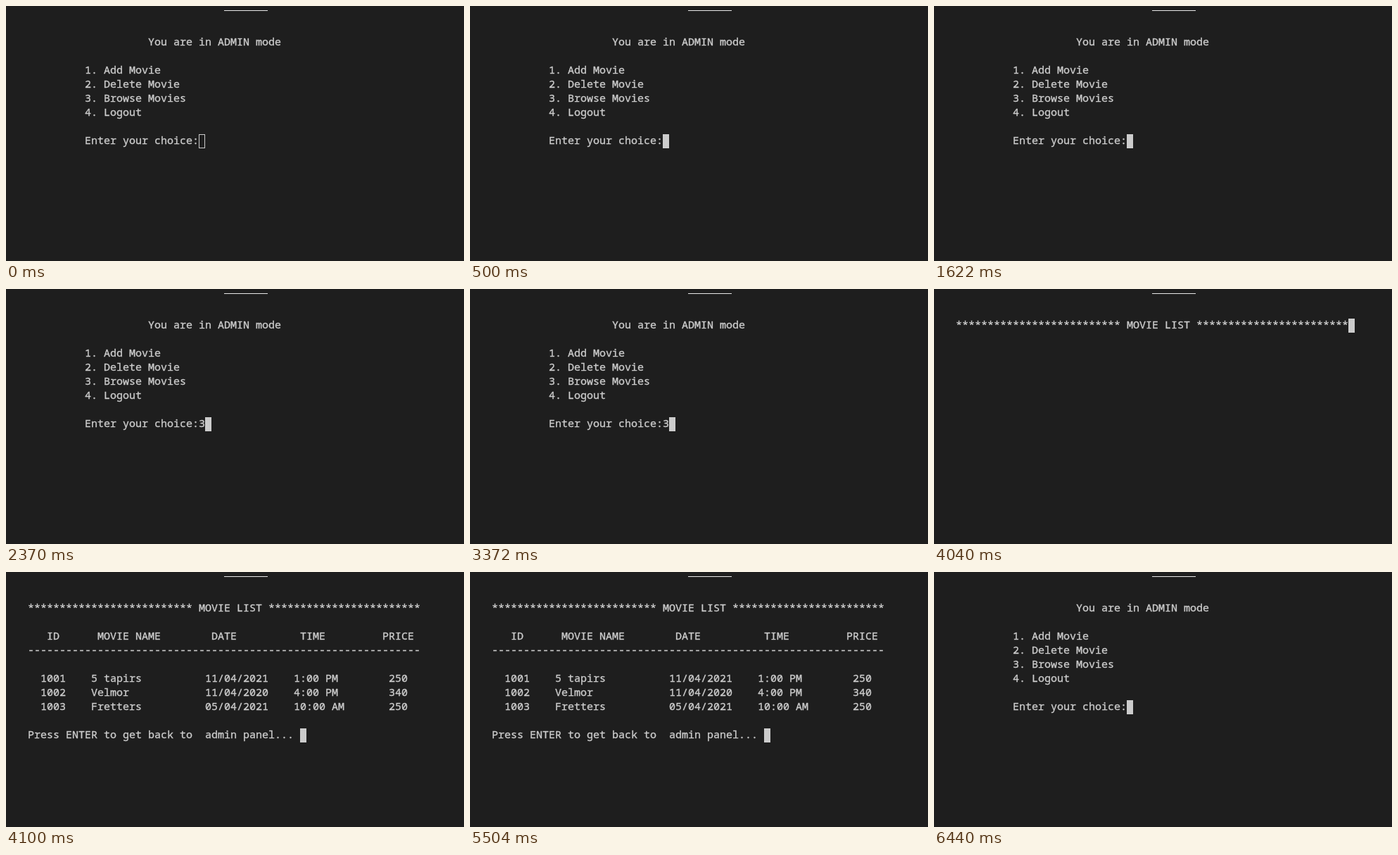
Recreate the animation shown at these times as an HTML page. Size 651 px wide and 362 px high, loop 8 s.

```html
<!DOCTYPE html>
<html lang="en">
<head>
<meta charset="utf-8">
<title>Terminal movie list</title>
<style>
  html, body { margin: 0; width: 100%; height: 100%; overflow: hidden; background: #1e1e1e; }
  .stage { position: relative; width: 651px; height: 362px; overflow: hidden; background: #1e1e1e; }
  .rule { position: absolute; left: 310px; top: 6px; width: 62px; height: 1px; background: #e7e7e7; }

  /* Character grid: 9 x 20 px cells, first column at x = 31 */
  pre {
    position: absolute; left: 31px; top: 40px; margin: 0;
    font: 15px/20px "Noto Sans Mono", "DejaVu Sans Mono", monospace;
    font-variant-ligatures: none;
    color: #ccc; white-space: pre;
    -webkit-text-stroke: 0.35px #ccc;
  }
  .body { top: 80px; }
  .digit { left: 274px; top: 180px; }
  .cursor {
    position: absolute; left: 0; top: 0; width: 9px; height: 20px;
    box-sizing: border-box; border: 1px solid #ccc;
  }

  .menu, .digit, .head, .body, .cursor { animation: 8s step-end infinite; }
  .menu { animation-name: menu; }
  .digit { animation-name: digit; }
  .head { animation-name: head; }
  .body { animation-name: body; }
  .cursor { animation-name: cursor; }

  @keyframes menu {
    0%, 80.5%, 100% { visibility: visible; }
    50.5% { visibility: hidden; }
  }
  @keyframes digit {
    0%, 50.5%, 100% { visibility: hidden; }
    29.625% { visibility: visible; }
  }
  @keyframes head {
    0%, 80.5%, 100% { visibility: hidden; }
    50.5% { visibility: visible; }
  }
  @keyframes body {
    0%, 80.5%, 100% { visibility: hidden; }
    51.25% { visibility: visible; }
  }
  @keyframes cursor {
    0% { transform: translate(274px, 182px); background: transparent; }
    6.25% { transform: translate(274px, 182px); background: #ccc; }
    29.625% { transform: translate(283px, 182px); background: #ccc; }
    50.5% { transform: translate(589px, 42px); background: #ccc; }
    51.25% { transform: translate(418px, 222px); background: #ccc; }
    80.5%, 100% { transform: translate(274px, 182px); background: #ccc; }
  }
</style>
</head>
<body>
<div class="stage">
  <div class="rule"></div>
<pre class="menu">                   You are in ADMIN mode

         1. Add Movie
         2. Delete Movie
         3. Browse Movies
         4. Logout

         Enter your choice:</pre>
<pre class="digit">3</pre>
<pre class="head">************************** MOVIE LIST ************************</pre>
<pre class="body">   ID      MOVIE NAME        DATE          TIME         PRICE
--------------------------------------------------------------

  1001    5 tapirs          11/04/2021    1:00 PM        250
  1002    Velmor            11/04/2020    4:00 PM        340
  1003    Fretters          05/04/2021    10:00 AM       250

Press ENTER to get back to  admin panel... </pre>
  <div class="cursor"></div>
</div>
</body>
</html>
```
